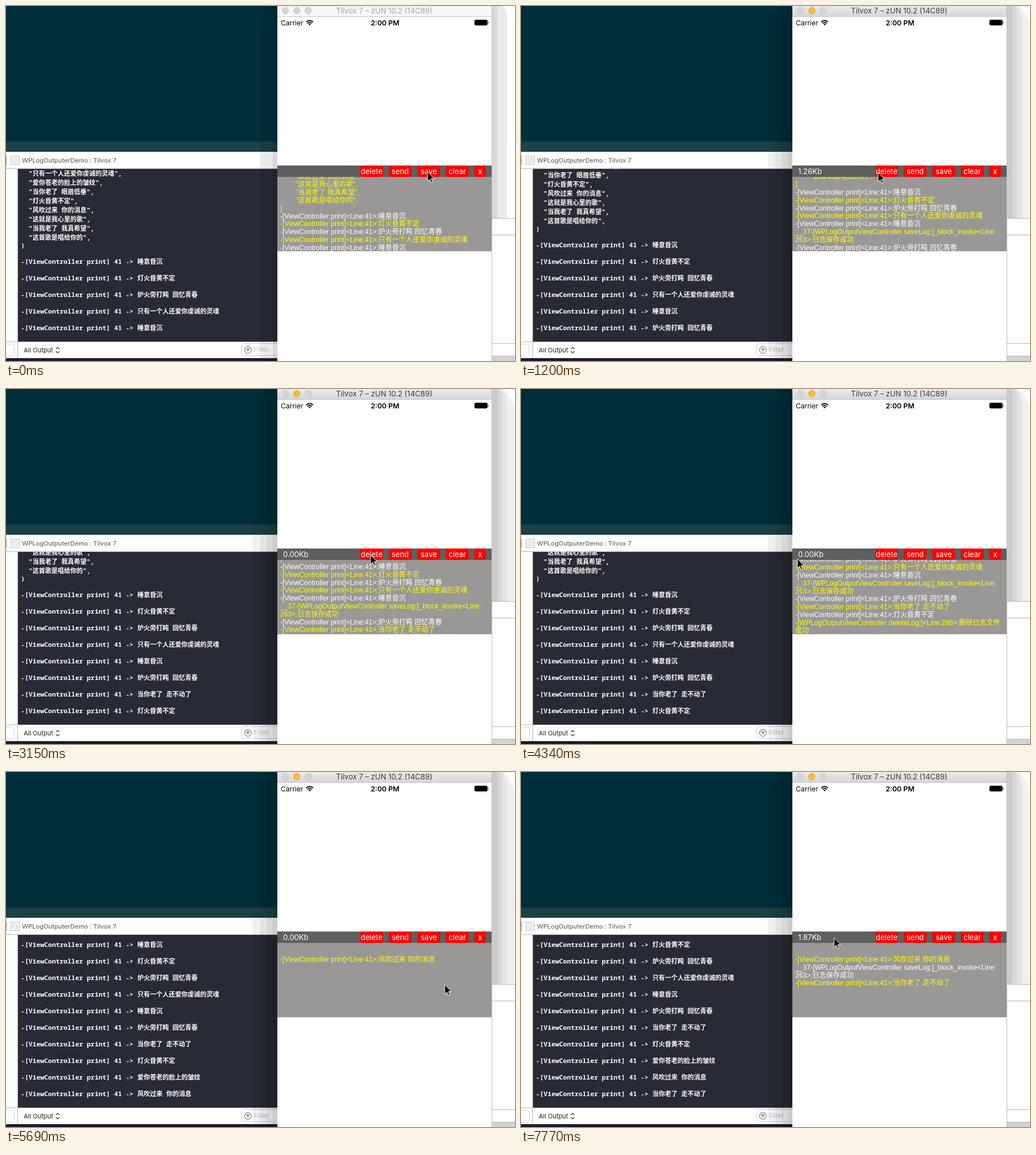
An HTML page for the animation above (8000 ms loop, 891 px wide and 621 px high).

```html
<!DOCTYPE html>
<html lang="zh-CN">
<head>
<meta charset="utf-8">
<style>
html, body { margin: 0; width: 100%; height: 100%; overflow: hidden; background: #fff; }
svg { display: block; }
text { white-space: pre; font-family: Inter, "Noto Sans CJK SC", "Noto Sans CJK", sans-serif; }
#console text { font: 600 11.33px "Noto Sans Mono", "Noto Sans CJK SC", "Noto Sans CJK", monospace; fill: #fff; }
#console .zh { font-size: 11px; }
#log text, #fresh text { font: 12px "Liberation Sans", "Noto Sans CJK SC", "Noto Sans CJK", sans-serif; }
.btn { font-size: 13px; fill: #fff; text-anchor: middle; }
</style>
</head>
<body>
<svg width="891" height="621" viewBox="0 0 891 621">
  <defs>
    <linearGradient id="bar" x2="0" y2="1"><stop stop-color="#ebebeb"/><stop offset="1" stop-color="#d5d5d5"/></linearGradient>
  </defs>

  <!-- editor -->
  <rect width="891" height="621" fill="#fefefe"/>
  <rect width="476" height="237" fill="#002f3b"/>
  <rect y="237" width="476" height="18" fill="#1b4046"/>
  <path d="M0 284.5H476M20.5 285V616M0 587.5H476" stroke="#b5b5b5"/>
  <path d="M.5 262V278" stroke="#888"/>
  <rect x="8.5" y="262.500" width="15" height="15" fill="#f1f1f1" stroke="#aaa" stroke-dasharray="2 1"/>
  <circle cx="16" cy="270" r="4" fill="none" stroke="#c4c4c4" stroke-dasharray="2 1"/>
  <text x="28" y="274" font-size="11" font-weight="500" fill="#6c6c6c">WPLogOutputerDemo : Tilvox 7</text>
  <rect x="21" y="285" width="455" height="302" fill="#282a35"/>
  <svg id="console" x="21" y="285" width="455" height="296"><g></g></svg>
  <rect x="-8.500" y="591.500" width="23" height="21" rx="4" fill="#fff" stroke="#d2d2d2"/>
  <text x="31" y="606" font-size="11" fill="#222">All Output</text>
  <path d="M87.500 600l3-3 3 3M87.500 604l3 3 3-3" fill="none" stroke="#333" stroke-width="1.200"/>
  <rect x="412.500" y="590.500" width="75" height="21" rx="4" fill="#fff" stroke="#cfcfcf"/>
  <circle cx="423.500" cy="601.500" r="6" fill="none" stroke="#555"/>
  <path d="M420 599.500h7M421 601.500h5M422.500 603.500h2" stroke="#555"/>
  <text x="434" y="605" font-size="11" fill="#c0c0c0">Filter</text>
  <rect y="616" width="476" height="5" fill="#1b1c2b"/>

  <!-- window shadow -->
  <g id="idle" fill="#000" fill-opacity=".08">
    <rect x="445" y="-10" width="432" height="660" rx="30"/>
    <rect x="467" y="-20" width="393" height="660" rx="20"/>
  </g>
  <g id="focus" fill="#000" fill-opacity=".055">
    <rect x="432" y="-12" width="458" height="660" rx="52"/>
    <rect x="445" y="-14" width="432" height="660" rx="40"/>
    <rect x="456" y="-18" width="412" height="660" rx="30"/>
    <rect x="467" y="-20" width="393" height="660" rx="20"/>
  </g>
  <rect x="850" y="371" width="41" height="241" fill="#fdfdfd"/>
  <rect x="850" y="612" width="41" height="9" fill="#d3d3d3"/>
  <path d="M850 371.500h41M850 400.500h41M850 590.500h41M850 612.500h41" stroke="#b4b4b4"/>

  <!-- simulator window -->
  <rect x="475" width="375" height="621" fill="#fff"/>
  <path d="M850.500 0V621" stroke="#bdbdbd"/>
  <rect id="title" x="475" width="375" height="18"/>
  <path d="M475 18.500h375" stroke="#c8c8c8"/>
  <g fill="#d6d6d6" stroke="#c2c2c2">
    <circle cx="489" cy="8" r="5.500"/>
    <circle id="amber" cx="509" cy="8" r="5.500"/>
    <circle cx="529" cy="8" r="5.500"/>
  </g>
  <text id="name" x="662" y="13" font-size="13" text-anchor="middle">Tilvox 7 – zUN 10.2 (14C89)</text>
  <text x="481" y="33.500" font-size="12">Carrier</text>
  <g fill="none" stroke="#000" stroke-width="1.800">
    <path d="M525.500 28a8.500 8.500 0 0 1 12 0M527.700 30.500a5.400 5.400 0 0 1 7.600 0"/>
    <path d="M531.500 34l-2-2a2.800 2.800 0 0 1 4 0z" fill="#000" stroke="none"/>
  </g>
  <text x="663.500" y="33.500" font-size="12.300" font-weight="600" text-anchor="middle">2:00 PM</text>
  <rect x="820.500" y="24.500" width="22" height="9" rx="2" stroke="#000"/>
  <path d="M844 27q2 2 0 4z"/>

  <!-- log panel -->
  <rect x="475" y="279" width="375" height="150" fill="#999896"/>
  <rect x="475" y="279" width="375" height="20" fill="#5f5f5f"/>
  <text id="size" x="485" y="294" font-size="13" fill="#fff"></text>
  <g id="buttons"></g>
  <svg id="log" x="475" y="299" width="375" height="130"><g></g></svg>
  <svg id="fresh" x="475" y="299" width="375" height="130"></svg>

  <path id="cursor" d="M0 0V16.500L3.800 13 6.500 19 9 18 6.400 12H11.600Z" fill="#000" stroke="#fff"/>
</svg>
<script>
const $ = q => document.querySelector(q);
const NS = "http://www.w3.org/2000/svg";
const YELLOW = "#ffff00", WHITE = "#fff";

function add(parent, tag, attrs, str = "") {
  const el = document.createElementNS(NS, tag);
  for (const k in attrs) el.setAttribute(k, attrs[k]);
  el.textContent = str;
  parent.append(el);
  return el;
}

const sleepy = "睡意昏沉", lamp = "灯火昏黄不定", fire = "炉火旁打盹 回忆青春",
      only = "只有一个人还爱你虔诚的灵魂", old = "当你老了 走不动了",
      face = "爱你苍老的脸上的皱纹", wind = "风吹过来 你的消息";
const verses = [only, face, "当你老了 眼眉低垂", lamp, wind, "这就是我心里的歌", "当我老了 我真希望", "这首歌是唱给你的"];
const prints = [sleepy, lamp, fire, only, sleepy, fire, old, lamp, face, wind, old];

// console text, in the coordinates of its clipped view
const con = $("#console g");
function conLine(x, y, before, zh, after = "") {
  const t = add(con, "text", { x, y }, before);
  add(t, "tspan", { class: "zh" }, zh);
  add(t, "tspan", {}, after);
}
verses.forEach((v, i) => conLine(18.6, 12 + 16 * i, '"', v, '",'));
conLine(5, 138, ")", "");
prints.forEach((p, i) => conLine(5, 166 + 29 * i, "-[ViewController print] 41 -> ", p));

// panel text
const PITCH = 13.8;
const entry = s => "-[ViewController print]<Line:41>:" + s;
const saved = ["__37-[WPLogOutputViewController saveLog:]_block_invoke<Line:", "263>:日志保存成功"];
const removed = ["-[WPLogOutputViewController deleteLog:]<Line:286>:删除日志文件", "成功"];
function logLines(parent, y, groups) {
  let row = 0;
  groups.forEach((g, i) => g.forEach(s =>
    add(parent, "text", { x: s[0] == '"' ? 32 : 5, y: y + PITCH * row++, fill: i % 2 ? WHITE : YELLOW }, s)));
}
logLines($("#log g"), 0, [
  [...verses.slice(4).map(v => `"${v}",`), ")"],
  ...[sleepy, lamp, fire, only, sleepy].map(s => [entry(s)]),
  saved, [entry(fire)], [entry(old)], [entry(lamp)], removed, [entry(face)]
]);
logLines($("#fresh"), 33, [[entry(wind)], saved, [entry(old)]]);

[["delete", 640], ["send", 690], ["save", 740], ["clear", 790], ["x", 830]].forEach(([s, x]) => {
  const w = s == "x" ? 20 : 40;
  add($("#buttons"), "rect", { x: x - w / 2, y: 279, width: w, height: 20, rx: 4, fill: "#f00" });
  add($("#buttons"), "text", { x, y: 293.500, class: "btn" }, s);
});

// schedules in ticks of 150 ms
const printTicks = [5, 13, 21, 30, 38, 47];
const logRows = [[0, 9], [2, 11], [5, 12], [13, 13], [21, 13.1], [22, 14], [23, 16], [30, 17]];
const freshRows = [[0, 0], [38, 1], [45, 3], [47, 4]];
const sizes = [[0, ""], [2, "1.26Kb"], [21, "0.00Kb"], [45, "1.87Kb"]];
const path = [
  [0, 738, 290], [2, 738, 290], [7, 628, 290], [8, 625, 291], [10, 626, 291], [14, 685, 287],
  [18, 638, 290], [22, 638, 290], [25, 575, 277], [29, 484, 297], [30, 560, 290], [32, 837, 280],
  [34, 784, 285], [36, 784, 285], [38, 768, 372], [39, 768, 372], [40, 757, 330], [41, 735, 274],
  [42, 721, 282], [43, 730, 288], [44, 730, 288], [45, 690, 320], [46, 597, 378], [52, 548, 290], [60, 548, 290]
];
const held = (list, n) => list.filter(e => e[0] <= n).pop()[1];

function at(n) {
  const i = path.findIndex(p => p[0] > n);
  const [a, x, y] = path[i - 1], [b, u, v] = path[i];
  const k = (n - a) / (b - a);
  return [x + (u - x) * k, y + (v - y) * k];
}

function draw(n) {
  const active = n >= 1, cleared = n >= 36;
  $("#idle").style.display = active ? "none" : "";
  $("#focus").style.display = active ? "" : "none";
  $("#title").setAttribute("fill", active ? "url(#bar)" : "#f6f6f6");
  $("#name").setAttribute("fill", active ? "#3c3c3c" : "#a6a6a6");
  $("#amber").setAttribute("fill", active ? "#fdbc2f" : "#d6d6d6");
  $("#amber").setAttribute("stroke", active ? "#e0a028" : "#c2c2c2");

  const shift = printTicks.filter(p => p <= n).length;
  con.setAttribute("transform", `translate(0 ${-29 * shift})`);
  $("#log g").setAttribute("transform", `translate(0 ${127.7 - PITCH * held(logRows, n)})`);
  $("#log").style.display = cleared ? "none" : "";
  const rows = held(freshRows, n);
  [...$("#fresh").children].forEach((t, i) => t.style.display = i < rows ? "" : "none");
  $("#size").textContent = held(sizes, n);
  $("#cursor").setAttribute("transform", `translate(${at(n).map(Math.round).join(" ")})`);
}

function frame() {
  draw(Math.floor((performance.now() % 8000 + 30) / 150));
  requestAnimationFrame(frame);
}
frame();
</script>
</body>
</html>
```
